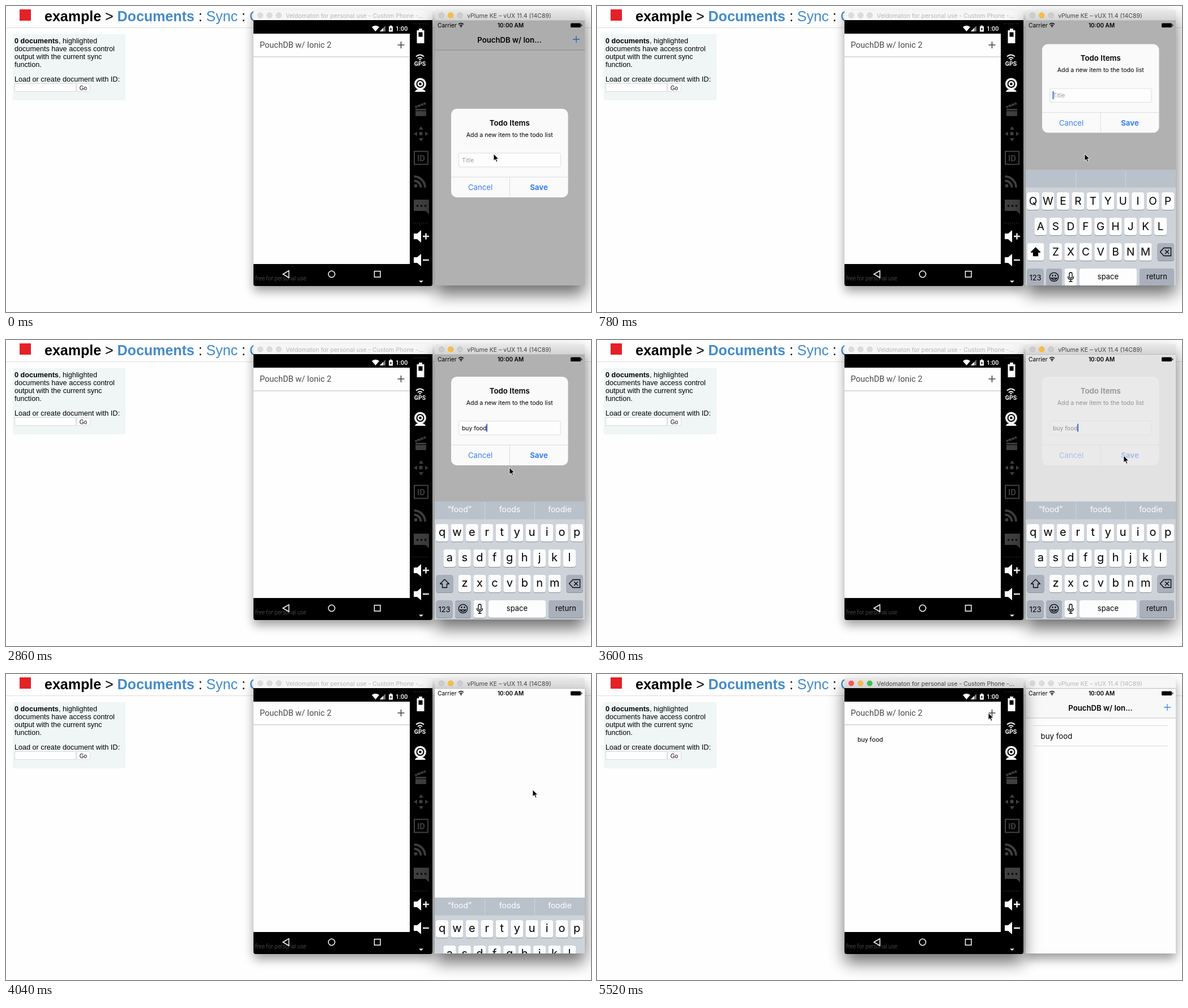
Write an HTML page that moves like this. It is 1033 px wide and 542 px high and loops after 8000 ms.

```html
<!DOCTYPE html>
<html lang="en">
<head>
<meta charset="utf-8">
<title>Synced todo list</title>
<style>
html, body { margin: 0; width: 100%; height: 100%; overflow: hidden; background: #fefefe; }
svg { display: block; width: 100%; height: 100%; }
text { white-space: pre; }
.page { font-family: "Liberation Sans", Arial, sans-serif; font-size: 12.64px; }
.mac { font-family: Inter, sans-serif; }
.droid { font-family: Roboto, sans-serif; }
.mid { text-anchor: middle; }
.semi { font-weight: 600; }
.bold { font-weight: 700; }
</style>
</head>
<body>
<svg viewBox="0 0 1033 542" xmlns="http://www.w3.org/2000/svg">
  <defs>
    <filter id="blurBig" filterUnits="userSpaceOnUse" x="350" y="-80" width="760" height="700"><feGaussianBlur stdDeviation="14.5"/></filter>
    <filter id="blurSmall" filterUnits="userSpaceOnUse" x="350" y="-80" width="760" height="700"><feGaussianBlur stdDeviation="9"/></filter>
    <linearGradient id="bar" x1="0" y1="0" x2="0" y2="1"><stop offset="0" stop-color="#e9e9e9"/><stop offset="1" stop-color="#d3d3d3"/></linearGradient>
    <clipPath id="phoneClip"><rect x="757" y="26" width="265" height="469"/></clipPath>
  </defs>

  <!-- web page -->
  <g class="page">
    <rect width="1033" height="542" fill="#fefefe"/>
    <path d="M0 38.5H1033" stroke="#dcdcdc"/>
    <rect x="24" y="6" width="20" height="20" fill="#e32227"/>
    <text x="68" y="27" font-size="25"><tspan class="bold">example</tspan> &gt; <tspan class="bold" fill="#428bca">Documents</tspan> : <tspan fill="#428bca">Sync</tspan> : <tspan fill="#428bca">Channels</tspan></text>
    <rect x="12" y="50" width="199" height="117" fill="#f0f5f5"/>
    <text x="15" y="66"><tspan class="bold">0 documents</tspan>, highlighted</text>
    <text x="15" y="80">documents have access control</text>
    <text x="15" y="94">output with the current sync</text>
    <text x="15" y="108">function.</text>
    <text x="15" y="134">Load or create document with ID:</text>
    <rect x="15.5" y="137.5" width="108" height="14" fill="#fff" stroke="#dadada"/>
    <rect x="124.5" y="137.5" width="24" height="14" rx="3" fill="#fff" stroke="#dadada"/>
    <text class="mid" x="136.3" y="148.6" font-size="10">Go</text>
  </g>

  <g id="windows">
  <!-- Android window -->
  <g id="winA" class="droid">
    <g id="shadowA"></g>
    <path id="barA" d="M437 25V11q0-4 4-4H749q4 0 4 4V25z"/>
    <g id="lightsA"></g>
    <text id="titleA" class="mac" x="494" y="20.500" font-size="10.500">Veldomaton for personal use - Custom Phone -...</text>
    <path d="M437 25H753V492q0 4-4 4H441q-4 0-4-4z"/>
    <rect x="437" y="49" width="276" height="408" fill="#fefefe"/>
    <path d="M437 90H713" stroke="#cfcfcf" stroke-width="1.600"/>
    <path d="M652.500 45L646 37.200Q652.500 32.400 659 37.200z" fill="#fff"/>
    <path d="M660 45H670V35z" fill="#777"/><path d="M660 45H666V39z" fill="#fff"/>
    <path d="M676 36H678V34.500H681V36H683V45.500H676z" fill="#fff"/><path d="M680.300 37.500L677.600 41.500H679.300L678.700 44L681.500 40.300H679.800z"/>
    <text x="688" y="44" font-size="10.800" font-weight="500" fill="#fff">1:00</text>
    <text x="448" y="74" font-size="14.500" fill="#484848">PouchDB w/ Ionic 2</text>
    <path d="M691.500 69H703.500M697.500 63V75" stroke="#444" stroke-width="1.600"/>
    <text id="itemA" x="460" y="120" font-size="11.600">buy food</text>
    <text x="440" y="486" font-size="10" font-weight="300" fill="#606060">free for personal use</text>
    <g fill="none" stroke="#fff" stroke-width="1.500">
      <path d="M489 475L499.500 468.800V481.200z"/><circle cx="575" cy="475" r="5.700"/><rect x="650.500" y="469.700" width="10.500" height="10.500"/>
    </g>
    <path d="M719 31.500H747M719 384.500H747" stroke="#404040" stroke-dasharray="1.5 2"/>
    <g fill="#fff">
      <path d="M729 40H735V43H738.500V66H725.500V43H729z"/><rect x="728.500" y="46.500" width="7" height="8" fill="#000"/>
      <path d="M724 89.500Q731 83.500 738 89.500M727 93Q731 89.500 735 93" fill="none" stroke="#fff" stroke-width="2"/><circle cx="731" cy="95" r="1.500"/>
      <text class="mid bold" x="731" y="105.500" font-size="10.500">GPS</text>
      <circle cx="731.500" cy="138" r="10.500"/><circle cx="731.500" cy="138" r="7" fill="#000"/><circle cx="731.500" cy="138" r="5"/><circle cx="731.500" cy="138" r="2.300" fill="#000"/>
      <path d="M722 152Q724 147.500 727 148H736Q739 147.500 741 152z"/>
      <g id="speakers"></g>
      <path d="M729 486.500H737L733 490z"/>
    </g>
    <g fill="#3f3f3f">
      <path d="M723 182H742V195H723zM723 181L722 177.500 740 170.500 742 174z"/>
      <path d="M723 185.500H742M727 179L725 176M733 177L731 174M738 175L736 172" stroke="#000"/>
      <circle cx="732.500" cy="226" r="3.200"/>
      <path d="M729 219L733 213 737 219zM729 234L733 240 737 234zM726 222.500L720 226.500 726 230zM740 222.500L746 226.500 740 230z"/>
      <rect x="721" y="257.500" width="24" height="23" fill="none" stroke="#444" stroke-width="2"/>
      <text class="mid bold" x="733" y="274.500" font-size="15">ID</text>
      <circle cx="723.500" cy="318.500" r="3"/>
      <path d="M720.500 309.500A12 12 0 0 1 732.500 321.500M720.500 302A19.500 19.500 0 0 1 740 321.500" fill="none" stroke="#3f3f3f" stroke-width="4"/>
      <path d="M720 343H747V369L741 363H720z"/>
      <path d="M725 354h3m4 0h3m4 0h3" stroke="#000" stroke-width="3"/>
    </g>
  </g>

  <!-- phone window -->
  <g id="winP" class="mac">
    <g id="shadowP"></g>
    <path id="barP" d="M757 26V11q0-4 4-4H1018q4 0 4 4V26z"/>
    <g id="lightsP"></g>
    <text id="titleP" class="mid" x="888.500" y="20.500" font-size="10.500">vPlume KE – vUX 11.4 (14C89)</text>
    <path d="M757 25.500H1022" stroke="#bdbdbd"/>
    <rect x="757" y="26" width="265" height="469" fill="#fdfdfd"/>
    <g clip-path="url(#phoneClip)">
      <g id="header">
        <rect x="757" y="26" width="265" height="52" fill="#f8f8f8"/>
        <path d="M757 78H1022" stroke="#c4c4c8"/>
        <text class="semi mid" x="889" y="65" font-size="13.200">PouchDB w/ Ion...</text>
        <path d="M1001 59H1013M1007 53V65" stroke="#3b86f7" stroke-width="1.300"/>
      </g>
      <g id="itemP">
        <path d="M770 91.500H1008M770 127.500H1008" stroke="#d8d8d8"/>
        <text x="783.500" y="114.500" font-size="13.300">buy food</text>
      </g>
      <rect id="dim" x="757" y="26" width="265" height="469"/>
      <text x="762" y="37.600" font-size="10.300">Carrier</text>
      <path d="M799 32.500Q803.500 28.500 808 32.500M801 34.800Q803.500 32.500 806 34.800" fill="none" stroke="#000" stroke-width="1.400"/><path d="M801.900 36.200L803.500 38 805.100 36.200Q803.500 34.800 801.900 36.200z"/>
      <text class="semi mid" x="891" y="37.600" font-size="10">10:00 AM</text>
      <rect x="997" y="30.500" width="18" height="7.500" rx="1.500"/><path d="M1016.500 32.500V36" stroke="#000" stroke-width="1.300"/>

      <g id="dialog">
        <rect x="786" width="206.500" height="157" rx="10" fill="#fafafa"/>
        <text class="semi mid" x="889.300" y="29.500" font-size="13.300">Todo Items</text>
        <text class="mid" x="889.300" y="49.500" font-size="10.700">Add a new item to the todo list</text>
        <rect x="799.500" y="78.500" width="179.500" height="24.500" rx="1.500" fill="#fdfdfd" stroke="#dedede"/>
        <text id="hint" x="805" y="94.500" font-size="10.500" fill="#9c9c9c">Title</text>
        <text id="typed" x="805" y="94.500" font-size="10.400"></text>
        <path d="M786 121H992.500M889.500 121V157" stroke="#dcdcdc"/>
        <text class="mid" x="837.500" y="144" font-size="13.200" fill="#387ef5">Cancel</text>
        <text class="mid bold" x="941" y="144" font-size="13.200" fill="#387ef5">Save</text>
      </g>
      <rect id="caret" width="2" height="14" fill="#4169e1"/>
      <g id="keyboard"></g>
    </g>
  </g>
  </g>

  <path id="mouse" d="M0 0V12.300L2.900 9.600 5 14.300 7 13.400 5 8.900H9z" stroke="#fff" stroke-width=".9" stroke-linejoin="round"/>
</svg>
<script>
const $ = id => document.getElementById(id);
const show = (id, on) => $(id).setAttribute('visibility', on ? 'visible' : 'hidden');
const LOOP = 8000;

const runs = [[600, 780, 920], [1220, 1370, 1520, 1670], [1970, 2120, 2270, 2420],
  [2720, 2860, 3010, 3150], [3450, 3600, 3750, 3900, 4050, 4200, 4340, 4490],
  [4630, 4780], [5070, 5220, 5370, 5520]];
const ticks = [0, ...runs.flat()];

// time, typed text, suggestions, their opacity
const typing = [
  [0, '', ['', '', ''], 1],
  [1220, 'b', ['', '', ''], 1],
  [1370, 'bu', ['“b', 'be', 'bu'], .6],
  [1520, 'buy', ['“bu”', 'but', 'buy'], 1],
  [1670, 'buy ', ['“buy”', 'buying', 'buyer'], 1],
  [1970, 'buy f', ['the', 'a', 'it'], 1],
  [2120, 'buy fo', ['“f”', 'for', 'fun'], 1],
  [2270, 'buy fo', ['“fo”', 'for', 'four'], .6],
  [2420, 'buy foo', ['“fo”', 'for', 'four'], 1],
  [2720, 'buy food', ['“food”', 'foods', 'foodie'], .7],
  [2860, 'buy food', ['“food”', 'foods', 'foodie'], 1]
];
const mousePath = [[0, 861, 262], [2720, 861, 262], [2860, 889, 226], [3010, 918, 209],
  [3150, 930, 205], [4050, 930, 205], [4200, 908, 201], [4340, 838, 190], [4490, 771, 178],
  [4630, 704, 160], [4780, 671, 170], [5070, 676, 150], [5220, 687, 90], [5370, 691, 69]];
const dialogY = [[0, 182], [599, 182], [600, 91.5], [780, 67.5], [920, 65]];
const boardY = [[0, 215], [599, 215], [600, 40], [780, 4], [920, 0], [3750, 0], [3900, 110], [4050, 215]];
const fade = [[0, 1], [3150, 1], [3450, .85], [3600, .35], [3750, 0]];

function track(keys, t, col = 1) {
  const i = keys.findIndex(k => k[0] > t);
  if (i < 0) return keys[keys.length - 1][col];
  const a = keys[i - 1], b = keys[i];
  return a[col] + (b[col] - a[col]) * (t - a[0]) / (b[0] - a[0]);
}
const last = (list, test) => list.filter(test).pop();

function buildShadow(id, x, w) {
  const rect = (size, drop, alpha) => `<rect id="${size}${id}" x="${x}" y="${7 + drop}" width="${w}" height="489"
    rx="4" opacity="${alpha}" filter="url(#blur${size})"/>`;
  $('shadow' + id).innerHTML = rect('Small', 9, .38) + rect('Big', 15, .56);
}

function buildLights() {
  const row = x => [0, 16.3, 32.6].map(d => `<circle cx="${x + d}" cy="16.5" r="4.8" stroke-width=".7"/>`).join('');
  $('lightsA').innerHTML = row(449);
  $('lightsP').innerHTML = row(769);
  $('speakers').innerHTML = [408, 450].map((y, i) =>
    `<path d="M720 ${y - 5}h6l7-6v22l-7-6h-6z"/>` +
    `<path d="M736 ${y}h11${i ? '' : `M741.500 ${y - 5.5}v11`}" stroke="#fff" stroke-width="2.4"/>`).join('');
}

function buildKeyboard() {
  const key = (x, y, w, fill, id = '') =>
    `<rect x="${x}" y="${y - 14}" width="${w}" height="31" rx="4" fill="#8b8f96"/>` +
    `<rect ${id && `id="${id}"`} x="${x}" y="${y - 15}" width="${w}" height="31" rx="4" fill="${fill}"/>`;
  const label = (x, y, s, size) => `<text class="mid" x="${x}" y="${y}" font-size="${size}">${s}</text>`;
  const white = '#fdfdfd', grey = '#a9b0bc';
  let caps = '', small = '';
  let out = '<rect x="757" y="286" width="265" height="32" fill="#b9c1cb"/>' +
    '<rect x="757" y="317.500" width="265" height="178" fill="#ced3da"/>' +
    '<path d="M845.500 287V317M933.500 287V317" stroke="#ced4dc"/><g id="words" fill="#fff">' +
    [801, 889.5, 978].map(x => label(x, 305, '', 14)).join('') + '</g>';
  [['qwertyuiop', 770], ['asdfghjkl', 783.4], ['zxcvbnm', 810]].forEach(([letters, x0], row) => {
    [...letters].forEach((c, i) => {
      const x = x0 + i * 26.45, y = 341 + row * 45;
      out += key(x - 11, y, 22, white);
      caps += label(x, y + 7, c.toUpperCase(), 19);
      small += label(x, y + 6, c, 20);
    });
  });
  out += key(759.5, 431, 30, grey, 'shiftKey') + key(989.5, 431, 29.5, grey) +
    key(759.5, 476, 29, grey) + key(793, 476, 28, grey) + key(825.5, 476, 21.5, white) +
    key(852, 476, 101, white) + key(958, 476, 61, grey) +
    label(774, 481.5, '123', 13) + label(902.5, 480, 'space', 13) + label(988.5, 480, 'return', 13) +
    `<g id="caps">${caps}</g><g id="small">${small}</g>` +
    '<path id="shiftIcon" d="M774.500 424L782.500 432H778.500V438.500H770.500V432H766.500z" stroke="#000" stroke-width="1.300" stroke-linejoin="round"/>' +
    '<g fill="none" stroke="#000" stroke-width="1.300">' +
    '<path d="M994.500 431.500L1001 424.500H1013.500V438.500H1001zM1003 428L1010 435M1010 428L1003 435"/>' +
    '<circle cx="807" cy="476" r="7.700"/><path d="M802 478Q807 484 812 478z"/>' +
    '<rect x="834" y="468" width="5" height="10" rx="2.500"/><path d="M831.500 475Q831.500 480.500 836.500 480.500T841.500 475M836.500 480.500V484M833.500 484H839.500"/></g>' +
    '<path d="M804.500 472V475M809.500 472V475" stroke="#000" stroke-width="1.800"/>';
  $('keyboard').innerHTML = out;
}

function setFocus(id, on, colors) {
  const win = $('win' + id), stack = $('windows');
  if (on && stack.lastElementChild !== win) stack.appendChild(win);
  $('bar' + id).setAttribute('fill', on ? 'url(#bar)' : '#f6f6f6');
  $('title' + id).setAttribute('fill', on ? '#444' : '#b6b6b6');
  show('Big' + id, on);
  show('Small' + id, !on);
  [...$('lights' + id).children].forEach((c, i) => {
    c.setAttribute('fill', on ? colors[i] : '#dcdcdc');
    c.setAttribute('stroke', on ? '#0002' : '#cfcfcf');
  });
}

function draw(time) {
  const t = last(ticks, s => s <= time);
  const [, text, words, wordAlpha] = last(typing, s => s[0] <= t);
  const y = track(dialogY, t), alpha = track(fade, t);
  const android = t >= 5520, capital = t < 1220;

  setFocus('A', android, ['#fc5753', '#fdbc40', '#33c748']);
  setFocus('P', !android, ['#cdcdcd', '#fdbc40', '#cdcdcd']);
  show('header', t < 600 || t >= 4050);
  show('itemP', t >= 4200);
  show('itemA', t >= 4340);

  $('dim').setAttribute('opacity', .3 * alpha);
  $('dialog').setAttribute('opacity', alpha);
  $('dialog').setAttribute('transform', `translate(0 ${y})`);
  $('typed').textContent = text;
  show('hint', !text);
  show('caret', t >= 600 && t <= 3750);
  $('caret').setAttribute('x', 804.5 + (text ? $('typed').getComputedTextLength() : 0));
  $('caret').setAttribute('y', y + 83.5);

  $('keyboard').setAttribute('transform', `translate(0 ${track(boardY, t)})`);
  $('words').setAttribute('opacity', wordAlpha);
  words.forEach((w, i) => { $('words').children[i].textContent = w; });
  show('caps', capital);
  show('small', !capital);
  $('shiftKey').setAttribute('fill', capital ? '#fdfdfd' : '#a9b0bc');
  $('shiftIcon').setAttribute('fill', capital ? '#000' : 'none');

  $('mouse').setAttribute('transform', `translate(${track(mousePath, t)} ${track(mousePath, t, 2)})`);
}

buildShadow('A', 437, 316);
buildShadow('P', 757, 265);
buildLights();
buildKeyboard();
const start = performance.now();
function loop() {
  draw((performance.now() - start) % LOOP);
  requestAnimationFrame(loop);
}
loop();
</script>
</body>
</html>
```
